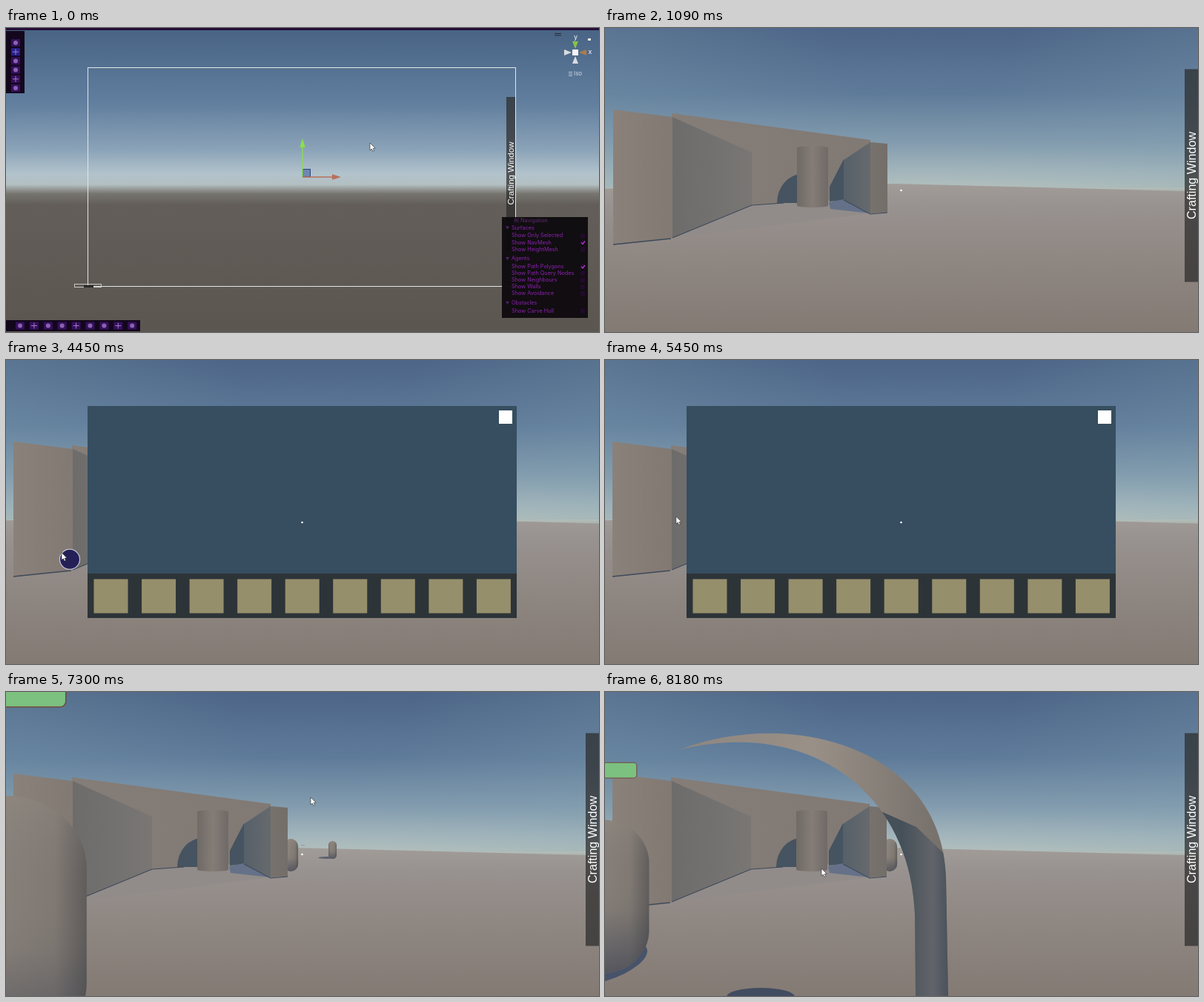
An HTML page with a canvas for the animation above (8.21 s loop, 800x410 px).

```html
<!DOCTYPE html>
<html lang="en">
<head>
<meta charset="utf-8">
<title>Crafting window</title>
<style>
html, body { margin: 0; width: 100%; height: 100%; overflow: hidden; background: #857c77; }
canvas { display: block; width: 100%; height: 100%; }
</style>
</head>
<body>
<canvas id="stage" width="800" height="410"></canvas>
<script>
const c = document.getElementById('stage').getContext('2d');
const LOOP = 8210, PLAY = 480, OPEN = 2580, CLOSE = 5990;
const GRAB = 3180, SWING = 3390, PERIOD = 1060, DROP = 5110;
const SWING_END = SWING + 2 * PERIOD;
const SANS = '"Liberation Sans", Arial, sans-serif';
const UI = 'Inter, sans-serif';

// Pointer key points: time, x, y
const toSlot = [[1850, 400, 219], [2500, 790, 109], [2640, 790, 109],
  [3050, 131, 310], [GRAB, 131, 310], [SWING, 75, 259]];
const toClose = [[SWING_END, 75, 259], [5880, 672, 75], [6270, 678, 74],
  [7300, 411, 142], [8180, 292, 238]];

const clamp = v => Math.max(0, Math.min(1, v));
const mix = (a, b, k) => a + (b - a) * k;

function along(path, t) {
  const i = path.findIndex(p => p[0] > t);
  if (i < 0) return path[path.length - 1].slice(1);
  const a = path[i - 1], b = path[i];
  const u = (t - a[0]) / (b[0] - a[0]), k = u * u * (3 - 2 * u);
  return [mix(a[1], b[1], k), mix(a[2], b[2], k)];
}

function pointerAt(t) {
  if (t < SWING) return along(toSlot, t);
  if (t >= SWING_END) return along(toClose, t);
  const a = (t - SWING) / PERIOD * 2 * Math.PI;
  return [420 - 345 * Math.cos(a), 259 + 140 * Math.sin(a)];
}

// Evenly spaced colours unless a stop gives its own position
function fade(g, cols) {
  cols.forEach((s, i) => Array.isArray(s) ? g.addColorStop(...s) : g.addColorStop(i / (cols.length - 1), s));
  return g;
}
const across = (x0, x1, ...cols) => fade(c.createLinearGradient(x0, 0, x1, 0), cols);
const down = (y0, y1, ...cols) => fade(c.createLinearGradient(0, y0, 0, y1), cols);

function rect(x, y, w, h, fill) {
  c.fillStyle = fill;
  c.fillRect(x, y, w, h);
}

function frameRect(x, y, w, h, col) {
  c.strokeStyle = col;
  c.lineWidth = 1;
  c.strokeRect(x + 0.5, y + 0.5, w, h);
}

function trace(xy) {
  c.beginPath();
  for (let i = 0; i < xy.length; i += 2) c.lineTo(xy[i], xy[i + 1]);
}

function poly(fill, ...xy) {
  trace(xy);
  c.fillStyle = fill;
  c.fill();
}

function line(col, w, ...xy) {
  trace(xy);
  c.strokeStyle = col;
  c.lineWidth = w;
  c.stroke();
}

function oval(x, y, rx, ry, fill, turn = 0) {
  c.beginPath();
  c.ellipse(x, y, rx, ry, turn, 0, 7);
  c.fillStyle = fill;
  c.fill();
}

function text(s, x, y, size, col, font = UI) {
  c.font = `${size}px ${font}`;
  c.textBaseline = 'middle';
  c.fillStyle = col;
  c.fillText(s, x, y);
}

function moved(x, y, turn, draw) {
  c.save();
  c.translate(x, y);
  c.rotate(turn);
  draw();
  c.restore();
}

function pointer(x, y) {
  moved(x, y, 0, () => {
    poly('#fff', 0, 0, 0, 10, 2.3, 8, 3.8, 11.3, 5.6, 10.5, 4.1, 7.4, 7.2, 7.2);
    c.closePath();
    c.strokeStyle = '#222b';
    c.lineWidth = 0.8;
    c.stroke();
  });
}

function tab(x, y, w, h, textX, textY, size) {
  rect(x, y, w, h, 'rgba(44,44,44,.72)');
  moved(textX, textY, -Math.PI / 2, () => {
    c.textAlign = 'center';
    text('Crafting Window', 0, 0, size, '#fff', SANS);
  });
}

function buttons(n, x, y, dx, dy, chosen) {
  for (let i = 0; i < n; i++) moved(x + i * dx, y + i * dy, 0, () => {
    rect(-6, -5, 12, 10, i === chosen ? '#26208c' : '#35105c');
    if (i % 3 === 1) {
      line('#a27ac4', 1, -4, 0, 4, 0);
      line('#a27ac4', 1, 0, -4, 0, 4);
    } else oval(0, 0, 3, 3, '#8b62b0');
  });
}

function navigation() {
  const groups = {
    'Surfaces': ['Show Only Selected', 'Show NavMesh', 'Show HeightMesh'],
    'Agents': ['Show Path Polygons', 'Show Path Query Nodes', 'Show Neighbours', 'Show Walls', 'Show Avoidance'],
    'Obstacles': ['Show Carve Hull']
  };
  const checked = ['Show NavMesh', 'Show Path Polygons'];
  rect(669, 255, 116, 136, '#0e0b0ff5');
  text('AI Navigation', 685, 260, 7.3, '#5e2a72');
  let y = 269.5;
  for (const [title, rows] of Object.entries(groups)) {
    text(title, 682, y, 7.3, '#8a22ac');
    poly('#5c1b73', 674, y - 2, 679, y - 2, 676.5, y + 2);
    y += 10.8;
    for (const label of rows) {
      text(label, 682, y, 7.3, '#8a22ac');
      rect(775, y - 3, 6, 6, '#220a2c');
      if (checked.includes(label)) line('#c03be0', 1.2, 776, y, 778, y + 2, 781, y - 2);
      y += 9.1;
    }
    y += 3.4;
  }
}

function compass() {
  ['#85c34b', '#b07a4c', '#d9dde0', '#d9dde0'].forEach((col, i) =>
    moved(768, 33, i * Math.PI / 2, () => poly(col, -4, -15, 4, -15, 0, -5)));
  rect(764, 29, 8, 8, '#f4f4f4');
  text('y', 766, 12, 9, '#fff');
  text('x', 785.5, 32, 9, '#fff');
  rect(785, 14, 4, 3, '#e6e6e6');
  text('Iso', 766, 62, 8, '#d4dbe2');
  for (let i = 0; i < 3; i++) rect(759, 59 + i * 2.4, 5, 1, '#bcc6d0');
  for (let i = 0; i < 2; i++) rect(740, 7 + i * 2.5, 9, 1, '#222c38');
}

function editor(t) {
  rect(0, 0, 800, 410, down(0, 410, '#486383', [.25, '#627f9f'], [.4, '#8ba3b8'],
    [.48, '#b2c3cc'], [.515, '#b3bfc1'], [.545, '#77756f'], [.58, '#635e59'], '#5b5650'));
  rect(0, 0, 800, 3, '#250d38');
  tab(675, 93, 12, 207, 682, 196, 11.6);
  frameRect(110, 53, 577, 295, '#e2e6e8');
  frameRect(92, 345, 36, 4, '#c8c8c4');
  rect(105, 347, 13, 3, '#292a2a');
  rect(400, 190, 11, 11, '#4765a09c');
  frameRect(400, 190, 10, 10, '#28457f');
  [['#8ae04d', 0], ['#b9705a', Math.PI / 2]].forEach(([col, turn]) => moved(400, 201, turn, () => {
    line(col, 1.3, 0, 0, 0, -40);
    poly(col, -3.7, -40, 3.7, -40, 0, -52);
  }));
  rect(0, 4, 25, 84, '#13071c');
  buttons(6, 13, 20, 0, 12.2, 1);
  rect(0, 394, 181, 15, '#13071c');
  buttons(9, 19, 401.5, 18.9, 0, -1);
  navigation();
  compass();
  const k = clamp(t / 430) ** 2;
  pointer(mix(491, 396, k), mix(155, -14, k));
}

function capsule(cx, top, h, w = h * .46) {
  const rx = w / 2, ry = Math.min(rx, h * .28);
  c.beginPath();
  c.roundRect(cx - rx, top, w, h, { x: rx, y: ry });
  c.fillStyle = across(cx - rx, cx + rx, '#77706a', '#8b837c', [.8, '#807973'], '#5f5c5a');
  c.fill();
  c.fillStyle = down(top, top + h, '#a69d9238', [.35, '#80808000'], [.6, '#30384a10'], '#30384a90');
  c.fill();
}

function enemy(cx, top, h) {
  oval(cx, top + h * .93, h * .31, h * .12, '#46536a', -.3);
  capsule(cx, top, h, h * .62);
  const bar = h * .1, gap = h * (.165 + h * .0005);
  c.beginPath();
  c.roundRect(cx - h * .23, top - gap - bar, h * .46, bar, bar * .22);
  c.fillStyle = '#7cc180';
  c.fill();
  c.strokeStyle = '#70483f';
  c.lineWidth = Math.min(1.5, h / 200);
  c.stroke();
}

function backdrop() {
  rect(-100, 0, 1000, 225, down(0, 222, '#4d6587', [.4, '#5f7b9a'],
    [.7, '#839cae'], [.88, '#a7b8bd'], [.96, '#b5c1bd'], '#a9b0ab'));
  rect(-100, 0, 1000, 215, fade(c.createRadialGradient(430, 0, 120, 430, 0, 480),
    ['#7fa0b000', '#7fa0b050']));
  poly(down(210, 410, '#a19c98', [.15, '#989290'], [.5, '#8f8782'], '#847a74'),
    -100, 218, 390, 210, 900, 223, 900, 410, -100, 410);
}

// Upright wall between two vertical edges
const wall = (x0, top0, low0, x1, top1, low1, ...cols) =>
  poly(across(x0, x1, ...cols), x0, top0, x1, top1, x1, low1, x0, low0);

function building() {
  const shade = '#465360', edge = '#3d4859';
  wall(89, 115, 240, 357, 151, 236, '#857d77', '#817973');
  poly('#918c8a', 90, 283, 197, 239, 321, 231, 357, 250);
  c.save();
  c.beginPath();
  c.rect(200, 190, 59, 46);
  c.clip();
  oval(265, 236, 34, 39, shade);
  c.restore();
  wall(302, 214, 234, 321, 177, 232, shade, shade);
  poly('#647188', 301, 235, 321, 231, 357, 250, 303, 244);
  wall(90, 120, 283, 197, 168, 239, '#6d6c6b', '#797674');
  line(edge, 1.2, 90, 283, 197, 239, 240, 236);
  wall(10, 110, 292, 90, 120, 283, '#8a817a', '#827973');
  line(edge, 1.5, 10, 292, 88, 284);
  wall(321, 178, 232, 357, 154, 250, '#566069', '#666a6d');
  wall(357, 154, 250, 380, 156, 249, '#78726d', '#746e6a');
  line(edge, 1.2, 321, 232, 357, 251, 380, 249);
  c.beginPath();
  c.roundRect(258, 159, 42, 83, { x: 21, y: 2.5 });
  c.fillStyle = across(258, 300, '#6f6a67', '#847c76', '#6f6a68');
  c.fill();
}

// The near body, cut open by the camera
function shell(dx) {
  moved(dx, 0, 0, () => {
    oval(210, 411, 46, 12, '#414c60');
    c.beginPath();
    c.moveTo(100, 78);
    c.bezierCurveTo(250, 20, 455, 75, 460, 250);
    c.lineTo(463, 410);
    c.lineTo(419, 410);
    c.lineTo(418, 300);
    c.bezierCurveTo(412, 130, 270, 35, 100, 78);
    c.fillStyle = across(100, 460, '#8d867f', '#999087', '#756f6a');
    c.fill();
    c.clip();
    poly(across(400, 463, '#455059', '#535a60', '#62646a', '#4a525b'),
      370, 160, 420, 182, 470, 230, 470, 410, 370, 410);
  });
}

function icon(x, y) {
  oval(x, y, 14, 14, '#d5d3e2');
  oval(x, y, 13, 13, '#242057');
}

function craftPanel(t) {
  rect(110, 62, 579, 286, '#364e5f');
  rect(110, 288, 579, 60, '#2d3438');
  for (let i = 0; i < 9; i++) rect(118.5 + i * 64.55, 295.5, 46, 46, '#968f6c');
  rect(665, 68, 18, 18, '#fff');
  if (t < GRAB) icon(141.5, 318);
}

function world(t) {
  backdrop();
  // Approach in perspective: size is the inverse of the remaining distance
  const size = 1 / mix(1 / 85, 1 / 350, (t - 6270) / 1030);
  const first = () => enemy(0, mix(190, 140, (size - 85) / 265), size);
  const walking = t > 5700 && t < 7490, behind = size < 110;
  if (walking && behind) first();
  if (t > 5940) {
    capsule(384, 198, 44);
    rect(398, 206, 5, 1.5, '#858f9288');
  }
  if (t > CLOSE && t < 6750) {
    const x = 417 + (t - 6270) / 60;
    oval(x, 221, 9, 4, '#67539060', .75);
    oval(x, 221, 7, 2.2, '#5f45a4b0', .75);
  } else if (t >= 6750) {
    oval(433, 223.5, 12, 1.5, '#59606e');
    capsule(440.5, 201, 24);
  }
  building();
  if (walking && !behind) first();
  if (t > 7400) {
    const u = clamp((t - 7400) / 780);
    enemy(mix(-30, -5, u), mix(188, 172, u), 1 / mix(1 / 95, 1 / 208, u));
  }
  if (t >= 7490) shell(-300 * (1 - clamp((t - 7490) / 690)) ** 2);
}

function game(t) {
  moved(60 * Math.exp((PLAY - t) / 150), 0, 0, () => world(t));
  if (t >= OPEN && t < CLOSE) craftPanel(t);
  else tab(782, 55.5, 18, 287, 792.5, 199, 16.1);
  oval(399.5, 219, 1.3, 1.3, '#fff');
  if (t >= toSlot[0][0]) {
    const [x, y] = pointerAt(t);
    if (t >= GRAB && t < DROP) icon(x + 11, y + 9);
    pointer(x, y);
  }
}

function frame(now) {
  const t = now % LOOP;
  if (t < PLAY) editor(t);
  else game(t);
  requestAnimationFrame(frame);
}
requestAnimationFrame(frame);
</script>
</body>
</html>
```
